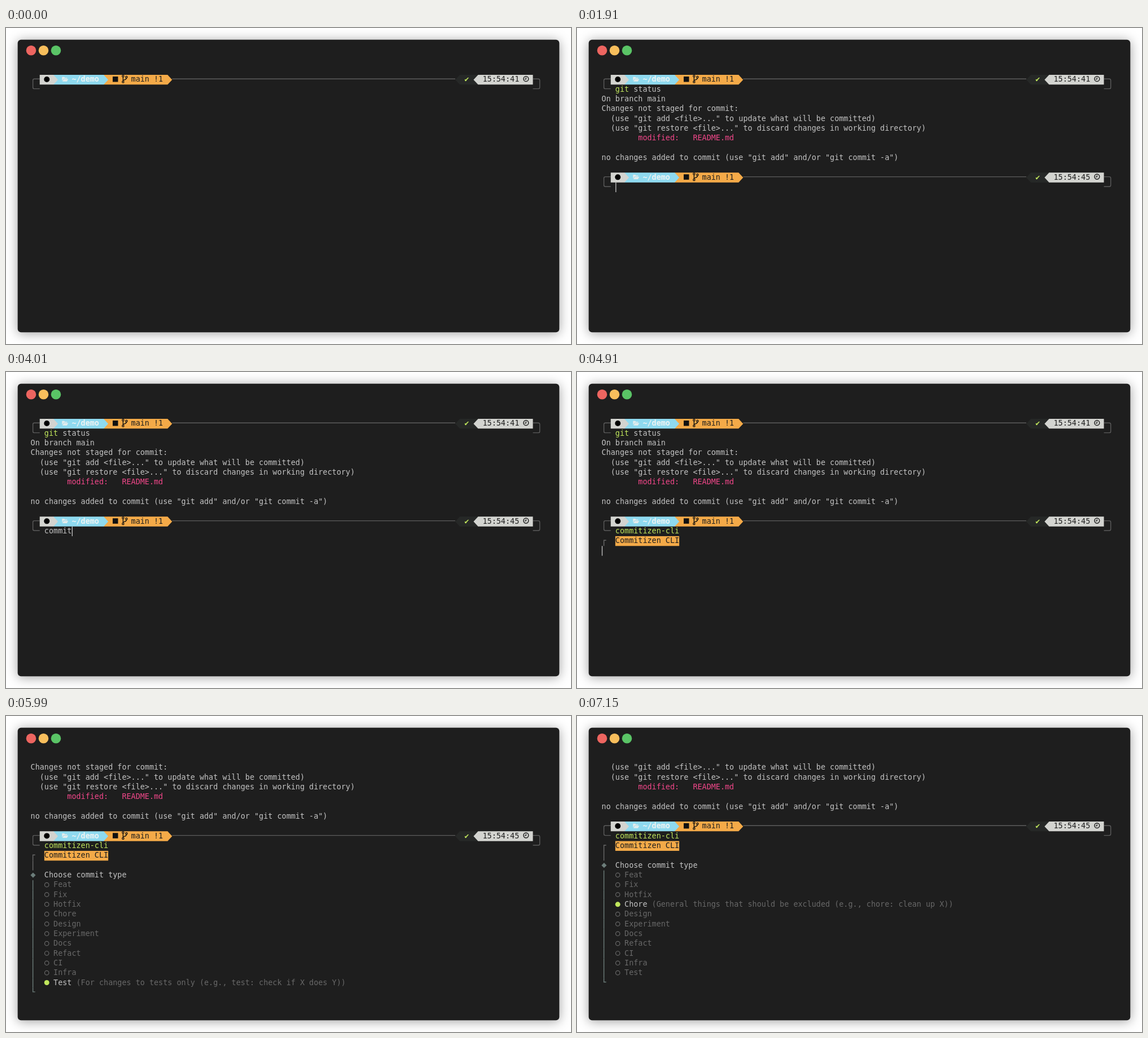
Recreate the animation shown at these times as an HTML page with a canvas. Size 1001 by 560 pixels, loop 8 s.

```html
<!DOCTYPE html>
<html lang="en">
<head>
<meta charset="utf-8">
<title>Terminal session</title>
<style>
  html, body { margin: 0; width: 100%; height: 100%; overflow: hidden; background: #fff; }
  canvas { display: block; width: 1001px; height: 560px; }
</style>
</head>
<body>
<canvas id="stage"></canvas>
<script>
const LOOP = 8000, W = 1001, H = 560;
const LEFT = 43.6, TOP = 83, COL = 8.09, ROW = 17.33;
const MONO = '13.44px "DejaVu Sans Mono", monospace';
const C = {
  bg: '#1e1e1e', text: '#c3c3c3', dim: '#686868', green: '#c0e65c', pink: '#f2478a',
  orange: '#f4aa48', blue: '#8fdaef', light: '#d3d4d0', dark: '#262827',
  frame: '#5c5c5c', bar: '#6c7d7a', black: '#111'
};

const canvas = document.getElementById('stage');
const ctx = canvas.getContext('2d');
const dpr = window.devicePixelRatio || 1;
canvas.width = W * dpr;
canvas.height = H * dpr;

const x = col => LEFT + col * COL;
const y = row => TOP + row * ROW;

function text(str, col, row, color = C.text, bold = false) {
  if (row < 0) return;
  ctx.font = (bold ? 'bold ' : '') + MONO;
  ctx.fillStyle = color;
  [...str].forEach((ch, i) => {
    if (ch !== ' ') ctx.fillText(ch, x(col + i), y(row) + 12.3);
  });
}

function poly(points, color) {
  ctx.fillStyle = color;
  ctx.beginPath();
  points.forEach(([px, py]) => ctx.lineTo(px, py));
  ctx.fill();
}

function line(points, color, width = 1.4) {
  ctx.strokeStyle = color;
  ctx.lineWidth = width;
  ctx.beginPath();
  points.forEach(([px, py]) => ctx.lineTo(px, py));
  ctx.stroke();
}

function disc(cx, cy, r, color) {
  ctx.fillStyle = color;
  ctx.beginPath();
  ctx.arc(cx, cy, r, 0, 7);
  ctx.fill();
}

function ring(cx, cy, r, color, width = 1.2) {
  ctx.strokeStyle = color;
  ctx.lineWidth = width;
  ctx.beginPath();
  ctx.arc(cx, cy, r, 0, 7);
  ctx.stroke();
}

function rect(col, row, cols, color) {
  ctx.fillStyle = color;
  ctx.fillRect(x(col), y(row), cols * COL, ROW);
}

// Prompt segment with a pointed end; dir 1 points right, -1 points left
function segment(from, to, row, color, dir) {
  const flat = x(dir > 0 ? from : to), neck = x(dir > 0 ? to : from);
  const t = y(row), b = t + ROW;
  poly([[flat, t], [neck, t], [neck + dir * COL, t + ROW / 2], [neck, b], [flat, b]], color);
}

function cursor(col, row) {
  ctx.fillStyle = C.text;
  ctx.fillRect(x(col) + 0.3, y(row), 1.3, ROW);
}

function bracket(edge, inner, row) {
  const a = y(row) + 7.3, b = a + ROW, ex = x(edge), ix = x(inner);
  ctx.strokeStyle = C.frame;
  ctx.lineWidth = 1.4;
  ctx.beginPath();
  ctx.moveTo(ix, a);
  ctx.arcTo(ex, a, ex, b, 2.5);
  ctx.arcTo(ex, b, ix, b, 2.5);
  ctx.lineTo(ix, b);
  ctx.stroke();
}

function folder(px, py) {
  poly([[px, py], [px + 4, py], [px + 5, py + 1.5], [px + 9, py + 1.5], [px + 9, py + 3],
        [px + 3, py + 3], [px, py + 7]], '#e4ecec');
  poly([[px + 3.2, py + 3.7], [px + 11, py + 3.7], [px + 8.6, py + 8], [px + 0.6, py + 8]], '#e4ecec');
}

function branch(px, py) {
  line([[px, py + 2], [px, py + 9]], C.black, 1.4);
  ctx.beginPath();
  ctx.moveTo(px + 6, py + 4);
  ctx.quadraticCurveTo(px + 6, py + 7, px, py + 8);
  ctx.stroke();
  [[0, 0.6], [6, 2.4], [0, 11]].forEach(([dx, dy]) => ring(px + dx, py + dy, 1.6, C.black, 1.3));
}

function prompt(row, time) {
  if (row < 0) return;
  const t = y(row), mid = t + ROW / 2;
  bracket(0.5, 2, row);
  bracket(111.5, 110, row);
  line([[x(31), t + 7.3], [x(93), t + 7.3]], C.frame);

  segment(16, 30, row, C.orange, 1);
  segment(5, 16, row, C.blue, 1);
  segment(2, 5, row, C.light, 1);
  disc(72.3, mid - 0.6, 5, '#000');
  folder(99.3, t + 3.7);
  text('~/demo', 9, row, '#eef3f3', true);
  ctx.fillStyle = C.black;
  ctx.fillRect(189, t + 3, 9.5, 9.5);
  branch(207.4, t + 1.6);
  text('main !1', 22, row, C.bg);

  segment(94, 98, row, C.dark, -1);
  text('✔', 95, row, C.green);
  segment(98, 110, row, C.light, -1);
  text(time, 99, row, C.bg);
  ring(921.3, t + 7.2, 4.4, C.bg, 1.5);
  line([[921.3, t + 4.4], [921.3, t + 7.6], [918.9, t + 7.6]], C.bg, 1.2);
}

const STATUS = [
  [0, 'On branch main'],
  [0, 'Changes not staged for commit:'],
  [2, '(use "git add <file>..." to update what will be committed)'],
  [2, '(use "git restore <file>..." to discard changes in working directory)'],
  [8, 'modified:   README.md', C.pink],
  [0, ''],
  [0, 'no changes added to commit (use "git add" and/or "git commit -a")']
];

const TYPES = ['Feat', 'Fix', 'Hotfix', 'Chore', 'Design', 'Experiment', 'Docs', 'Refact', 'CI', 'Infra', 'Test'];
const HINTS = {
  Feat: ['(For adding new features to the application (e.g., feat: add login endpoint))'],
  Fix: ['(For improvements and bugfixes that do not introduce a feature (e.g., fix: improve error message))'],
  Hotfix: ['(For critical fixes that must be released to production right away (e.g., hotfix: restore missing',
           'session handling))'],
  Chore: ['(General things that should be excluded (e.g., chore: clean up X))'],
  Test: ['(For changes to tests only (e.g., test: check if X does Y))']
};

// [start time, value]
const GIT_KEYS = [[0, ''], [500, 'g'], [590, 'gi'], [680, 'git'], [770, 'git '], [860, 'git s'],
                  [1360, 'git st'], [1540, 'git status']];
const CLI_KEYS = [[0, ''], [3360, 'c'], [3460, 'co'], [3690, 'com'], [3800, 'comm'], [3900, 'commi'],
                  [4010, 'commit'], [4410, 'commitizen-cli']];
const PICKS = [[4930, 'Feat'], [5990, 'Test'], [6330, 'Feat'], [6500, 'Fix'], [6990, 'Hotfix'], [7150, 'Chore']];
const SCROLL = [[0, 0], [4930, 3], [6990, 4]];

const at = (steps, t) => steps.reduce((v, [start, value]) => t >= start ? value : v, null);

function command(str, row, known) {
  const n = str.startsWith(known) ? known.length : 0;
  text(str.slice(0, n), 3, row, C.green);
  text(str.slice(n), 3 + n, row);
}

function bar(row, from, to, color) {
  line([[x(0.5), y(row) + from], [x(0.5), y(row) + to]], color);
}

function picker(pick, row) {
  const cy = y(row) + 8.4, cx = x(0.5) + 0.3;
  bar(row - 1, 0, ROW, C.dim);
  poly([[cx, cy - 4.6], [cx + 4.6, cy], [cx, cy + 4.6], [cx - 4.6, cy]], C.bar);
  text('Choose commit type', 3, row);
  for (const type of TYPES) {
    const on = type === pick, px = x(3.5) + 0.3;
    row++;
    bar(row, 0, ROW, C.bar);
    if (on) disc(px, y(row) + 8.2, 4.5, C.green);
    else ring(px, y(row) + 8.2, 3.7, C.dim);
    text(type, 5, row, on ? C.text : C.dim);
    if (!on) continue;
    const [first, rest] = HINTS[type];
    text(first, 6 + type.length, row, C.dim);
    if (rest) text(rest, 0, ++row, C.dim);
  }
  row++;
  line([[x(0.5), y(row)], [x(0.5), y(row) + 7.3], [x(1), y(row) + 7.3]], C.bar);
}

function windowFrame() {
  ctx.fillStyle = '#fff';
  ctx.fillRect(0, 0, W, H);
  ctx.save();
  ctx.shadowColor = 'rgba(0,0,0,.38)';
  ctx.shadowBlur = 20 * dpr;
  ctx.shadowOffsetY = 2 * dpr;
  ctx.fillStyle = C.bg;
  ctx.beginPath();
  ctx.roundRect(20.7, 20.7, 959.6, 518.6, 6);
  ctx.fill();
  ctx.restore();
  ['#ed6560', '#f7be5c', '#5ac466'].forEach((color, i) => disc(44.5 + 22 * i, 39.8, 8.8, color));
}

function draw(t) {
  ctx.setTransform(dpr, 0, 0, dpr, 0, 0);
  windowFrame();
  const up = at(SCROLL, t);

  prompt(-up, '15:54:41');
  const git = at(GIT_KEYS, t);
  command(git, 1 - up, 'git');
  if (t >= 500 && t < 1790) cursor(3 + git.length, 1);
  if (t >= 1790 && t < 1850) cursor(0, 2);
  if (t < 1850) return;

  STATUS.forEach(([col, str, color], i) => text(str, col, 2 + i - up, color));
  if (t < 1910) return cursor(0, 9);

  prompt(10 - up, '15:54:45');
  const cli = at(CLI_KEYS, t);
  command(cli, 11 - up, 'commitizen-cli');
  if (t < 4770) return cursor(3 + cli.length, 11);
  if (t < 4910) return cursor(0, 12);

  const head = 12 - up, hy = y(head);
  line([[x(1), hy + 7.3], [x(0.5), hy + 7.3], [x(0.5), hy + ROW]], C.dim);
  rect(3, head, 14, C.orange);
  text('Commitizen CLI', 3, head, C.bg);
  if (t < 4930) return cursor(0, 13);

  picker(at(PICKS, t), 14 - up);
}

const began = performance.now();
function tick() {
  draw((performance.now() - began) % LOOP);
  requestAnimationFrame(tick);
}
tick();
</script>
</body>
</html>
```
